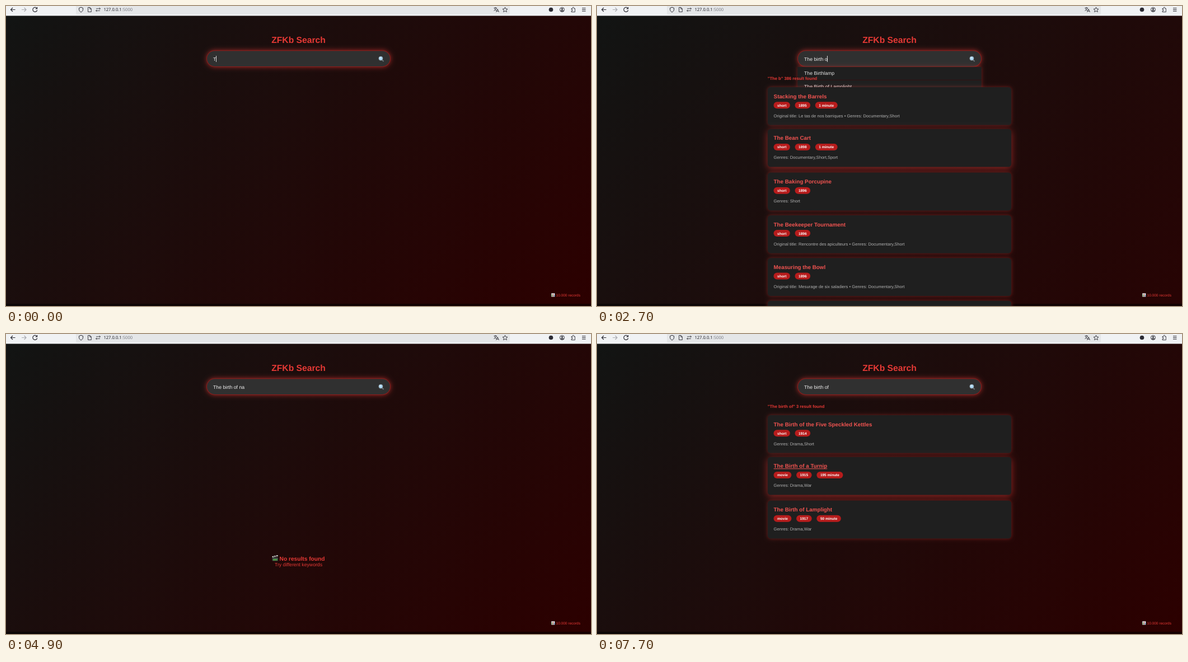
Write an HTML page with a canvas that moves like this. It is 1045x536 px and loops after 8000 ms.

```html
<!DOCTYPE html>
<html lang="en">
<head>
<meta charset="utf-8">
<title>Movie search</title>
<style>
  html, body { margin: 0; width: 1045px; height: 536px; overflow: hidden; background: #141414; }
  canvas { display: block; }
</style>
</head>
<body>
<canvas id="stage" width="1045" height="536"></canvas>
<script>
const ctx = document.getElementById('stage').getContext('2d');
const LOOP = 8000, RED = '#e53935', INK = '#2b2b33';
const SANS = '"Liberation Sans", Arial, sans-serif';

const COMMON = ['The Walnut Ferry', 'The Ninth Teaspoon', 'The Orchard Telegram', 'The Painted Weathervane', 'The Copper Turnstile'];
const WITH_B = ['The Bean Cart', 'The Baking Porcupine', 'The Beekeeper Tournament', 'The Bramble Postmaster', 'The Brass Cucumber'];
const WITH_BI = ['The Birthlamp', 'The Birdcage Inspector', 'The Big Umbrella Parade', 'The Bicycle Pudding', 'The Biscuit Astronomer'];
const KETTLES = 'The Birth of the Five Speckled Kettles';
const TURNIP = 'The Birth of a Turnip';
const LAMPLIGHT = 'The Birth of Lamplight';
const BIRTHS = [KETTLES, TURNIP, LAMPLIGHT];

// [start, query, caret shown, suggestions]
const TYPING = [
  [0, 'T', true], [400, 'The', true, COMMON], [600, 'The ', true, COMMON],
  [800, 'The b', true, WITH_B], [1000, 'The bi', true, WITH_BI], [1100, 'The b', true, WITH_B],
  [1300, 'The b', false], [2300, 'The birth', true, BIRTHS], [2500, 'The birth ', true, BIRTHS],
  [2700, 'The birth o', true, ['The Birthlamp', LAMPLIGHT]], [3600, 'The birth of', false],
  [4900, 'The birth of na', false], [5900, 'The birth of na', true], [6100, 'The birth of n', true],
  [6200, 'The birth of ', true], [6500, 'The birth of ', true, BIRTHS],
  [6700, 'The birth of ', true], [7000, 'The birth of', false]
];

// [title, tags, details]
const MANY = [
  ['Stacking the Barrels', ['short', '1895', '1 minute'], 'Original title: Le tas de nos barriques • Genres: Documentary,Short'],
  ['The Bean Cart', ['short', '1898', '1 minute'], 'Genres: Documentary,Short,Sport'],
  ['The Baking Porcupine', ['short', '1896'], 'Genres: Short'],
  ['The Beekeeper Tournament', ['short', '1896'], 'Original title: Rencontre des apiculteurs • Genres: Documentary,Short'],
  ['Measuring the Bowl', ['short', '1896'], 'Original title: Mesurage de six saladiers • Genres: Documentary,Short'],
  ['The Brass Cucumber', ['short', '1897'], 'Genres: Short']
];
const FEW = [
  [KETTLES, ['short', '1914'], 'Genres: Drama,Short'],
  [TURNIP, ['movie', '1915', '195 minute'], 'Genres: Drama,War'],
  [LAMPLIGHT, ['movie', '1917', '50 minute'], 'Genres: Drama,War']
];

function text(str, x, y, size, color, weight = '', align = 'left', family = SANS) {
  ctx.font = `${weight} ${size}px ${family}`;
  ctx.textAlign = align;
  ctx.fillStyle = color;
  ctx.fillText(str, x, y);
  return ctx.measureText(str).width;
}

function box(x, y, w, h, radius, fill) {
  ctx.beginPath();
  ctx.roundRect(x, y, w, h, radius);
  ctx.fillStyle = fill;
  ctx.fill();
}

function glowBox(x, y, w, h, radius, fill, blur, strength, drop = 0) {
  ctx.save();
  ctx.shadowColor = `rgba(229,57,53,${strength})`;
  ctx.shadowBlur = blur;
  ctx.shadowOffsetY = drop;
  box(x, y, w, h, radius, fill);
  ctx.restore();
}

function line(path, color = INK, width = 1) {
  ctx.strokeStyle = color;
  ctx.lineWidth = width;
  ctx.stroke(new Path2D(path));
}

function disc(x, y, r, color) {
  ctx.beginPath();
  ctx.arc(x, y, r, 0, 7);
  ctx.fillStyle = color;
  ctx.fill();
}

function background(pageHeight) {
  const half = (1045 + pageHeight) / 4, cy = 18 + pageHeight / 2;
  const gradient = ctx.createLinearGradient(522.5 - half, cy - half, 522.5 + half, cy + half);
  gradient.addColorStop(0, '#121413');
  gradient.addColorStop(1, '#2c0000');
  ctx.fillStyle = gradient;
  ctx.fillRect(0, 0, 1045, 536);
  ctx.fillStyle = 'rgba(0,0,0,.5)';
  ctx.fillRect(0, 532, 1045, 4);
}

function toolbar() {
  box(0, 0, 1045, 17.5, 0, '#f0f2f4');
  box(125, -5, 775, 20, 2, '#e4e6e8');
  line('M16.5 6.5H8.5M12 3L8.5 6.5L12 10', INK, 1.2);
  line('M28 6.5H36M32.5 3L36 6.5L32.5 10', '#a9abb0', 1.2);
  line('M55 4A4 4 0 1 0 55.7 7.5M55.6 2V4.8H52.8', INK, 1.2);
  line('M134 2.3L137.5 3.6V6C137.5 8.5 136 10.2 134 11C132 10.2 130.5 8.5 130.5 6V3.6Z');
  line('M146.5 2.5H150L152.3 5V10.5H146.5ZM149.8 2.5V5.2H152.3', INK, .9);
  line('M161 4.7H168.5M166.5 3L168.5 4.7L166.5 6.4M168 8.4H160.5M162.5 6.7L160.5 8.4L162.5 10.1', INK, .8);
  const w = text('127.0.0.1', 174.4, 9.3, 7.62, '#22222a', '', 'left', '"Noto Sans", sans-serif');
  text(':5000', 174.4 + w, 9.3, 7.62, '#7d7f86', '', 'left', '"Noto Sans", sans-serif');
  line('M871.5 3.5H877M874.2 2V3.5M876 3.5C875.5 6 873.5 7.5 871.5 8.5M872.5 4.5C873 6 874.5 7.3 876 8M875.5 11L878 5.3L880.5 11M876.4 9.2H879.6', INK, .9);
  line('M891.5 2.2L892.8 5.1L896 5.4L893.6 7.5L894.3 10.6L891.5 9L888.7 10.6L889.4 7.5L887 5.4L890.2 5.1Z', INK, .9);
  disc(973.5, 6.5, 3.8, INK);
  line('M997.4 6.5A4 4 0 1 1 989.4 6.5A4 4 0 1 1 997.4 6.5');
  disc(993.4, 5.3, 1.5, INK);
  box(990.9, 7.5, 5, 2, 1, INK);
  line('M1010 4.5H1012V3.5A1.3 1.3 0 0 1 1014.6 3.5V4.5H1016.3V10.7H1010V8.7H1011A1.2 1.2 0 0 0 1011 6.3H1010Z', INK, .9);
  line('M1029 3.8H1035.5M1029 6.5H1035.5M1029 9.2H1035.5');
}

function searchBox(query, caret) {
  text('ZFKb Search', 522.5, 65.5, 15.68, RED, 'bold', 'center');
  glowBox(358, 79.3, 329, 29.6, 14.8, '#8e1c1a', 9, .65);
  box(359, 80.3, 327, 27.6, 13.8, '#303030');
  const w = text(query, 370, 97.6, 8.71, '#f0f0f0');
  if (caret) box(Math.floor(370 + w), 89, 1, 11, 0, '#d8d8d8');
  line('M671.5 96L674.6 99', '#6d7478', 1.8);
  disc(669.4, 93.6, 3.9, '#87949b');
  disc(669.4, 93.6, 3.1, '#a9d6f2');
  disc(668.5, 92.6, 1.2, '#dff1fb');
}

function dropdown(items) {
  const h = items.length * 24;
  glowBox(358.2, 108.8, 328.6, h, [0, 0, 6, 6], '#1f1f1f', 7, .45);
  items.forEach((item, i) => {
    const y = 108.5 + i * 24;
    if (i) box(358.2, y - .7, 328.6, 1, 0, '#351112');
    text(item, 370, y + 14.7, 8.71, '#e6e6e6');
  });
}

function card([title, tags, details], index, underline) {
  const hover = index === 1;
  const y = 145 + index * 76.3 - (hover ? 1.6 : 0);
  if (hover) glowBox(304.8, y, 435.4, 67.8, 5.4, '#1f1f1f', 13, .6, 2.5);
  else glowBox(304.8, y, 435.4, 67.8, 5.4, '#1f1f1f', 6, .42);
  const w = text(title, 315.6, y + 19.7, 9.8, '#ef5350', 'bold');
  if (underline) box(315.6, 240.2, w, 1, 0, '#ef5350');
  let x = 315.5;
  for (const tag of tags) {
    ctx.font = `bold 6.53px ${SANS}`;
    const width = ctx.measureText(tag).width + 13.06;
    box(x, y + 26.2, width, 12, 6, '#b71c1c');
    text(tag, x + 6.53, y + 34.6, 6.53, '#fff', 'bold');
    x += width + 8.7;
  }
  text(details, 315.6, y + 53.6, 7.62, '#b0b0b0');
}

function heading(query, count) {
  text(`"${query}" ${count} result found`, 304.8, 131.8, 7.62, RED, 'bold');
}

function noResults() {
  text('No results found', 488.6, 404.7, 10.19, RED, 'bold');
  text('Try different keywords', 522.5, 415, 8.71, RED, '', 'center');
  box(475.6, 399.3, 10.3, 6.2, .8, '#3f4a45');
  box(477, 402, 7.5, 2.6, 0, '#4c9a3f');
  line('M475.6 398.2L485.6 396', '#d8d8d8', 2);
  line('M478 396.7L479 398.4M481.6 395.9L482.6 397.6', '#222', 1.3);
}

function recordCount() {
  text('10.000 records', 1026, 518.7, 6.53, RED, '', 'right');
  box(974.2, 513.3, 6.2, 6.2, .5, '#dfe6ea');
  box(975, 515.5, 1.2, 3.3, 0, '#4caf50');
  box(976.8, 514.2, 1.2, 4.6, 0, '#d9534f');
  box(978.6, 516.2, 1.2, 2.6, 0, '#3b82c4');
}

// value of the last [time, value] step reached
const stepAt = (t, steps) => steps.reduce((value, [time, next]) => t >= time ? next : value, 0);

function draw(t) {
  const [, query, caret, items] = TYPING.findLast(([start]) => t >= start);
  const many = t >= 1300 && t < 3600;
  background(many ? 860 : 514);
  toolbar();
  recordCount();
  searchBox(query, caret);
  if (items) dropdown(items);

  if (many) {
    const rest = (1 - Math.min(1, (t - 1200) / 900)) ** 4;
    ctx.save();
    ctx.globalAlpha = 1 - rest;
    ctx.translate(0, 10.9 * rest);
    heading('The b', 386);
    MANY.forEach((movie, i) => card(movie, i));
    ctx.restore();
  }

  if ((t >= 3600 && t < 4400) || t >= 6800) heading('The birth of', 3);
  ctx.globalAlpha = stepAt(t, [[3600, 1], [4400, .5], [4500, .1], [4900, 0], [7000, .6], [7100, .9], [7300, 1]]);
  if (ctx.globalAlpha) FEW.forEach((movie, i) => card(movie, i, i === 1 && t >= 7700));
  ctx.globalAlpha = stepAt(t, [[4400, .5], [4500, 1], [6800, 0]]);
  if (ctx.globalAlpha) noResults();
  ctx.globalAlpha = 1;
}

function tick() {
  draw(Math.floor(performance.now() % LOOP / 100) * 100);
  requestAnimationFrame(tick);
}
ctx.textRendering = 'geometricPrecision';
tick();
</script>
</body>
</html>
```
